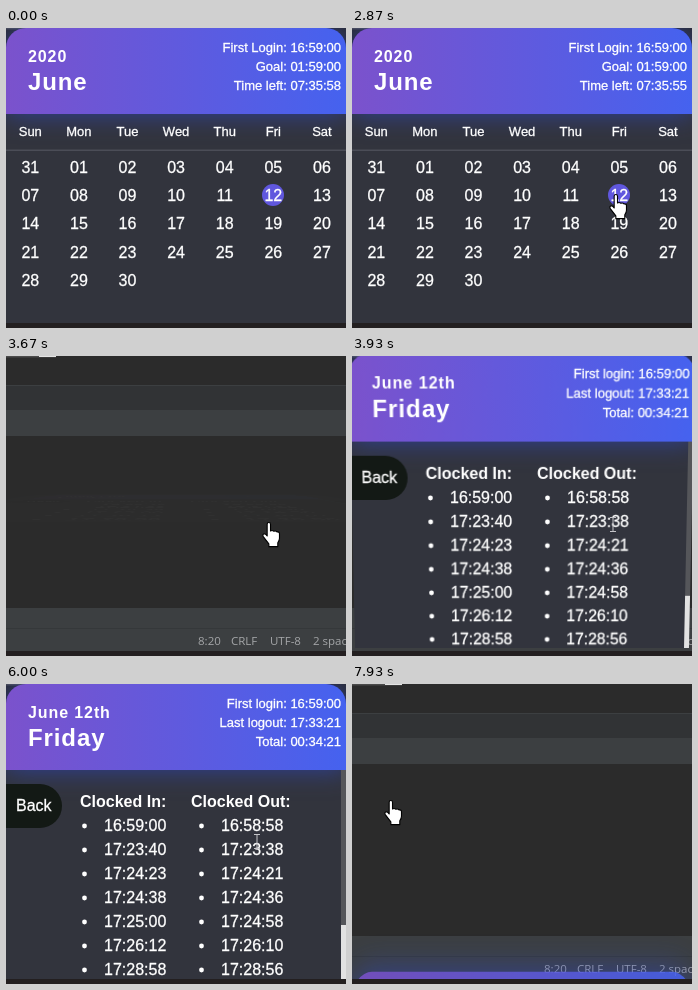
Write an HTML page that moves like this. It is 340 px wide and 300 px high and loops after 8000 ms.

```html
<!DOCTYPE html>
<html lang="en">
<head>
<meta charset="utf-8">
<style>
  html, body { margin: 0; height: 100%; overflow: hidden; background: #231f20; }
  svg { position: absolute; left: 0; top: 0; overflow: visible; }
  text { font: 16px "Liberation Sans", Arial, sans-serif; fill: #fff; stroke: #fff; stroke-width: .3px; }
  .window { position: absolute; width: 340px; height: 295px; overflow: hidden; background: #2b2b2b; }
  .status text { font: 11.5px "Open Sans", sans-serif; fill: #a4a6a8; stroke: none; }
  .header { fill: url(#violet); filter: drop-shadow(0 0 13px rgba(45, 75, 220, .6)); }
  .bold, .sub, .title { font-weight: bold; stroke: none; }
  .sub, .title { letter-spacing: .9px; }
  .title { font-size: 24px; }
  .small { font-size: 13px; }
  .mid { text-anchor: middle; }
  .end { text-anchor: end; }
</style>
</head>
<body>
<div class="window">
  <svg class="status" width="340" height="295">
    <defs>
      <linearGradient id="violet">
        <stop stop-color="#7b52cc"/><stop offset="1" stop-color="#4562ef"/>
      </linearGradient>
    </defs>
    <path fill="#4b4b4b" d="M0 0h50v1.5H0z"/>
    <path fill="#e4e4e4" d="M33 0h17v1H33z"/>
    <path fill="#313335" d="M0 30h340v24H0z"/>
    <path fill="#3c3f41" d="M0 29h340v1H0zM0 54h340v26H0zM0 252h340v43H0z"/>
    <path fill="#35383a" d="M0 272h340v1H0z"/>
    <text x="192" y="289">8:20</text><text x="225" y="289">CRLF</text>
    <text x="264" y="289">UTF-8</text><text x="307" y="289">2 spaces</text>
  </svg>
  <svg id="month" width="340" height="295"></svg>
  <svg id="day" width="340" height="295"></svg>
</div>
<svg width="340" height="300" style="overflow:hidden">
  <g id="cursor">
    <path id="arrow" d="M.5.5v16l3.700-3.600 2.600 6 2.400-1-2.600-5.900h5z" fill="#fff" stroke="#000"/>
    <path id="hand" transform="translate(-8 -1) scale(1.12)" fill="#fff" stroke="#000" stroke-linejoin="round"
      d="M5.500 12.500V2a1.500 1.500 0 0 1 3 0v6q1.500-1 3 .3 1.500-.8 3 .6 2-.3 2 1.600v4q0 2-1.500 4v3.500h-8v-2.500l-5-6.500q-1-2 1-2.500 1 0 2.500 2z"/>
    <path id="beam" d="M-3-6.500H3M0-6V7M-3 7.500H3" fill="none" stroke="#c4c4c8"/>
  </g>
</svg>
<script>
const LOOP = 8000;
const $ = id => document.getElementById(id);
const text = (x, y, str, cls = '', id = '') => `<text x="${x}" y="${y}" class="${cls}" id="${id}">${str}</text>`;
const pad = n => String(n).padStart(2, '0');

const panel = (sub, title, info) =>
  `<path fill="#32343d" d="M0 40h340v255H0z"/>
   <path class="header" d="M0 86V20A20 20 0 0 1 20 0H320A20 20 0 0 1 340 20V86z"/>` +
  text(22, 34, sub, 'sub') + text(22, 62, title, 'title') +
  info.map((line, i) => text(335, 24 + 19 * i, line, 'small end', `info${title}${i}`)).join('');

const column = (x, head, listX, times) =>
  text(x, 123, head, 'bold') + times.map((time, i) =>
    `<circle cx="${listX - 19.5}" cy="${142 + 24 * i}" r="2.4" fill="#fff"/>` +
    text(listX, 147 + 24 * i, time)).join('');

function buildMonth() {
  let html = panel('2020', 'June', ['First Login: 16:59:00', 'Goal: 01:59:00', '']);
  html += '<path fill="#4b4d57" d="M0 121.500h340v1.500H0z"/><circle cx="267" cy="167" r="11" fill="#6057de"/>';
  const colX = i => 24.3 + 48.6 * i;
  'Sun Mon Tue Wed Thu Fri Sat'.split(' ').forEach((name, i) => html += text(colX(i), 108, name, 'small mid'));
  for (let i = 0; i <= 30; i++)
    html += text(colX(i % 7), 144.5 + 28.4 * Math.floor(i / 7), pad(i || 31), 'mid');
  $('month').innerHTML = html;
}

// Each clock-out is listed two seconds before the clock-in beside it
function twoSecondsBefore(time) {
  const [h, m, s] = time.split(':').map(Number);
  const total = h * 3600 + m * 60 + s - 2;
  return [total / 3600, total / 60 % 60, total % 60].map(n => pad(Math.floor(n))).join(':');
}

function buildDay() {
  const clockIns = '16:59:00 17:23:40 17:24:23 17:24:38 17:25:00 17:26:12 17:28:58 17:30:24 17:33:23'.split(' ');
  $('day').innerHTML =
    panel('June 12th', 'Friday', ['First login: 16:59:00', 'Last logout: 17:33:21', 'Total: 00:34:21']) +
    '<path fill="#131915" d="M0 100h34a22 22 0 0 1 0 44H0z"/>' + text(10, 127, 'Back') +
    `<svg y="86" width="340" height="209" viewBox="0 86 340 209" style="overflow:hidden"><g id="list">` +
    column(74, 'Clocked In:', 98, clockIns) +
    column(185, 'Clocked Out:', 215, clockIns.map(twoSecondsBefore)) +
    `</g><path fill="#e2e2e2" d="M335 86h5v209h-5z"/>
     <rect id="thumb" x="335" y="86" width="5" height="155" fill="#55565a"/></svg>`;
}

buildMonth();
buildDay();

// Panel transitions, seeked from the loop clock
const slide = (offset, y, s, opacity = 1, easing = 'ease') =>
  ({ offset, transform: `translateY(${y}px) scaleY(${s})`, opacity, easing });
const bounceOut = [slide(0, 0, 1), slide(.2, -10, .985), slide(.4, 20, .9), slide(.45, 20, .9), slide(1, -2000, 3, 0)];
const riseIn = [slide(0, 3000, 5, 0, 'cubic-bezier(.215,.61,.355,1)'), slide(1, -20, .9)];
const flipIn = [90, -20, 10, -5, 0].map((deg, i) => {
  const offset = i && .2 + .2 * i;
  return {
    offset, opacity: Math.min(1, offset / .6), easing: i < 2 ? 'ease-in' : 'ease',
    transform: `perspective(400px) rotateX(${deg}deg)`,
  };
});

function transition(id, frames, delay, duration, fill = 'forwards') {
  const anim = $(id).animate(frames, { delay, duration, fill });
  anim.pause();
  return anim;
}
const transitions = [
  transition('month', bounceOut, 3340, 300),
  transition('month', riseIn, 7840, 180),
  transition('day', flipIn, 3646, 400, 'both'),
  transition('day', bounceOut, 7556, 300),
];

const progress = (t, from, to) => {
  const u = Math.min(1, Math.max(0, (t - from) / (to - from)));
  return u * u * (3 - 2 * u);
};

// Pointer glides between a few resting places
const ENTER = 860;
const glides = [
  { from: ENTER, to: 1670, x: 122, y: 284 },
  { from: 1700, to: 2800, x: 264, y: 167 },
  { from: 3600, to: 3800, x: 261, y: 168 },
  { from: 5730, to: 5980, x: 251, y: 157 },
  { from: 6060, to: 6680, x: 70, y: 110 },
  { from: 6880, to: 7270, x: 39, y: 117 },
];

function drawPointer(t) {
  $('cursor').style.display = t < ENTER ? 'none' : '';
  let x = 68, y = 2;
  for (const glide of glides) {
    const u = progress(t, glide.from, glide.to);
    x += (glide.x - x) * u;
    y += (glide.y - y) * u;
  }
  x -= 65 * Math.sin(Math.PI * progress(t, ENTER, 1670));
  $('cursor').setAttribute('transform', `translate(${Math.round(x)} ${Math.round(y)})`);
  const shape = t < 2400 ? 'arrow' : t < 3700 ? 'hand' : t < 6230 ? 'beam' : x > 56 ? 'arrow' : 'hand';
  for (const id of ['arrow', 'hand', 'beam']) $(id).style.display = id === shape ? '' : 'none';
}

function render(t) {
  for (const anim of transitions) anim.currentTime = t;
  $('infoJune2').textContent = 'Time left: 07:35:' + (58 - Math.floor((t + 400) / 1000));
  const scroll = progress(t, 4950, 5200) - progress(t, 5700, 5940);
  $('list').setAttribute('transform', `translate(0 ${-74 * scroll})`);
  $('thumb').setAttribute('y', 86 + 54 * scroll);
  drawPointer(t);
}

const start = performance.now();
function tick() {
  render((performance.now() - start) % LOOP);
  requestAnimationFrame(tick);
}
tick();
</script>
</body>
</html>
```
